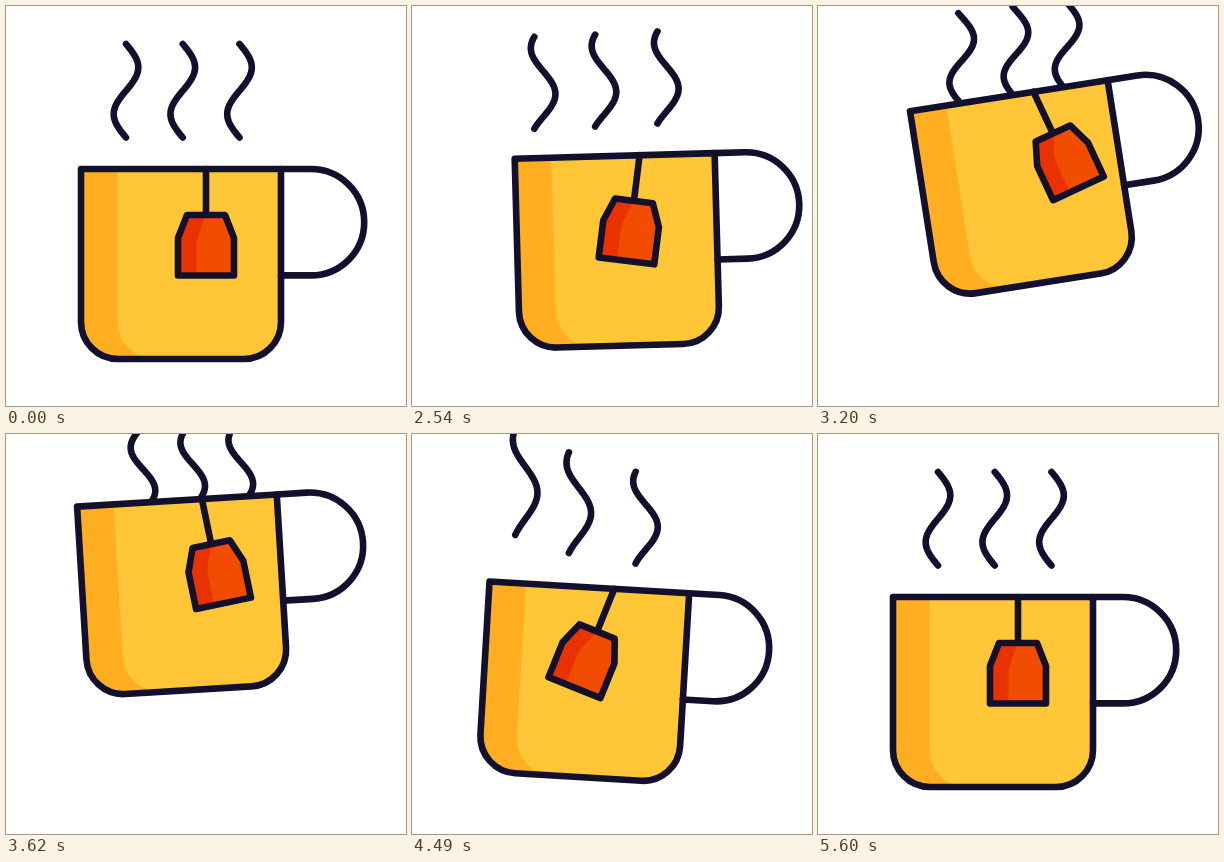
Recreate the animation shown at these times as an HTML page with a canvas. Size 400 by 400 pixels, loop 5840 ms.

```html
<!DOCTYPE html>
<html lang="en">
<head>
<meta charset="utf-8">
<title>Cup of tea</title>
<style>
html, body { margin: 0; width: 100%; height: 100%; overflow: hidden; background: #fff; }
canvas { display: block; width: 100vmin; height: 100vmin; }
</style>
</head>
<body>
<canvas id="stage" width="400" height="400"></canvas>
<script>
const ctx = document.getElementById('stage').getContext('2d');
const LOOP = 5840, START = 2030, END = 5600, STEP = 30;
const INK = '#13102e', YELLOW = '#ffc637', AMBER = '#ffae22', RED = '#f24c00', DARK_RED = '#e93200';

const clamp = u => Math.min(1, Math.max(0, u));
const ease = u => (1 - Math.cos(Math.PI * clamp(u))) / 2;

// Swings from one [time, value] extreme to the next, resting at each.
const glide = (...keys) => t => keys.reduce((v, [time, to], i) =>
  i ? v + (to - keys[i - 1][1]) * ease((t - keys[i - 1][0]) / (time - keys[i - 1][0])) : to, 0);

const cupX = glide([START, 0], [2720, 36], [2960, 36.5], [4080, -18], [4650, 0]);
const cupY = glide([2180, 0], [3680, -97], [4700, 0]);
const cupTurn = glide([2246, 0], [3320, -9.2], [4080, 7.7], [4843, 0]);
const tagTurn = glide([START, 0], [2500, 7.3], [3290, -26], [4250, 28], [5130, -7], [END, 0]);

// The plumes trail the cup; the rightmost follows soonest.
const plumes = [0, 1, 2].map(i => ({
  x: 120 + 56.75 * i,
  drift: glide([START, 0], [3100 - 200 * i, 24], [4830 - 310 * i, -10], [END - 550 * i, 0]),
  tip: glide([START, 0], [4150 - 275 * i, -53], [5340 - 410 * i, 0]),
  foot: glide([START, 0], [4050 - 225 * i, -59], [4950 - 170 * i, 0])
}));

// Three whole waves run along each plume: gentle start, longer finish.
const wave = t => -3 * (1 - (1 - clamp((t - START) / (END - START)) ** 1.3) ** 1.6);

function rotateAt(x, y, deg) {
  ctx.translate(x, y);
  ctx.rotate(deg * Math.PI / 180);
  ctx.translate(-x, -y);
}

function poly(...pts) {
  ctx.beginPath();
  pts.forEach(p => ctx.lineTo(...p));
}

function fill(color) {
  ctx.fillStyle = color;
  ctx.fill();
}

function drawPlume(p, t) {
  const top = 38 + p.tip(t), height = 131.5 + p.foot(t) - top;
  const x = p.x + p.drift(t), phase = wave(t);
  ctx.beginPath();
  for (let u = 0; u <= 1; u += 1 / 64) {
    ctx.lineTo(x + 12.3 * Math.sin(2 * Math.PI * (u + phase)), top + u * height);
  }
  ctx.stroke();
}

// A panel of the cup: left edge at 75, round lower corners.
function panel(right, turn) {
  ctx.beginPath();
  ctx.moveTo(75, 163);
  ctx.lineTo(right, 163);
  ctx.arcTo(right, 353, right + turn, 353, 37);
  ctx.arcTo(75, 353, 75, 316, 37);
  ctx.closePath();
}

function drawCup() {
  panel(275, -37);
  fill(YELLOW);
  panel(111.5, 37);
  fill(AMBER);
  panel(275, -37);
  ctx.stroke();

  ctx.beginPath();
  ctx.moveTo(275, 163);
  ctx.arc(305, 216.2, 53.2, -Math.PI / 2, Math.PI / 2);
  ctx.lineTo(275, 269.4);
  ctx.stroke();
}

function tagPath() {
  poly([181, 209], [219, 209], [228, 232], [228, 269.5], [172, 269.5], [172, 232]);
  ctx.closePath();
}

function drawTag() {
  poly([200, 163], [200, 209]);
  ctx.stroke();
  tagPath();
  fill(RED);
  poly([181, 209], [200, 209], [192, 230], [190.5, 238], [190.5, 269.5], [172, 269.5], [172, 232]);
  fill(DARK_RED);
  tagPath();
  ctx.stroke();
}

function draw(t) {
  ctx.fillStyle = '#fff';
  ctx.fillRect(0, 0, 400, 400);
  ctx.strokeStyle = INK;
  ctx.lineWidth = 6.6;
  ctx.lineCap = ctx.lineJoin = 'round';

  plumes.forEach(p => drawPlume(p, t));

  ctx.save();
  ctx.translate(cupX(t), cupY(t));
  rotateAt(175, 258, cupTurn(t));
  drawCup();
  // The tag hangs from the rim but keeps its own angle.
  rotateAt(200, 163, tagTurn(t) - cupTurn(t));
  drawTag();
  ctx.restore();
}

const origin = performance.now();
function tick() {
  const t = (performance.now() - origin) % LOOP;
  const moved = Math.floor((t - START) / STEP) * STEP;
  draw(Math.min(END, START + Math.max(0, moved)));
  requestAnimationFrame(tick);
}
tick();
</script>
</body>
</html>
```
